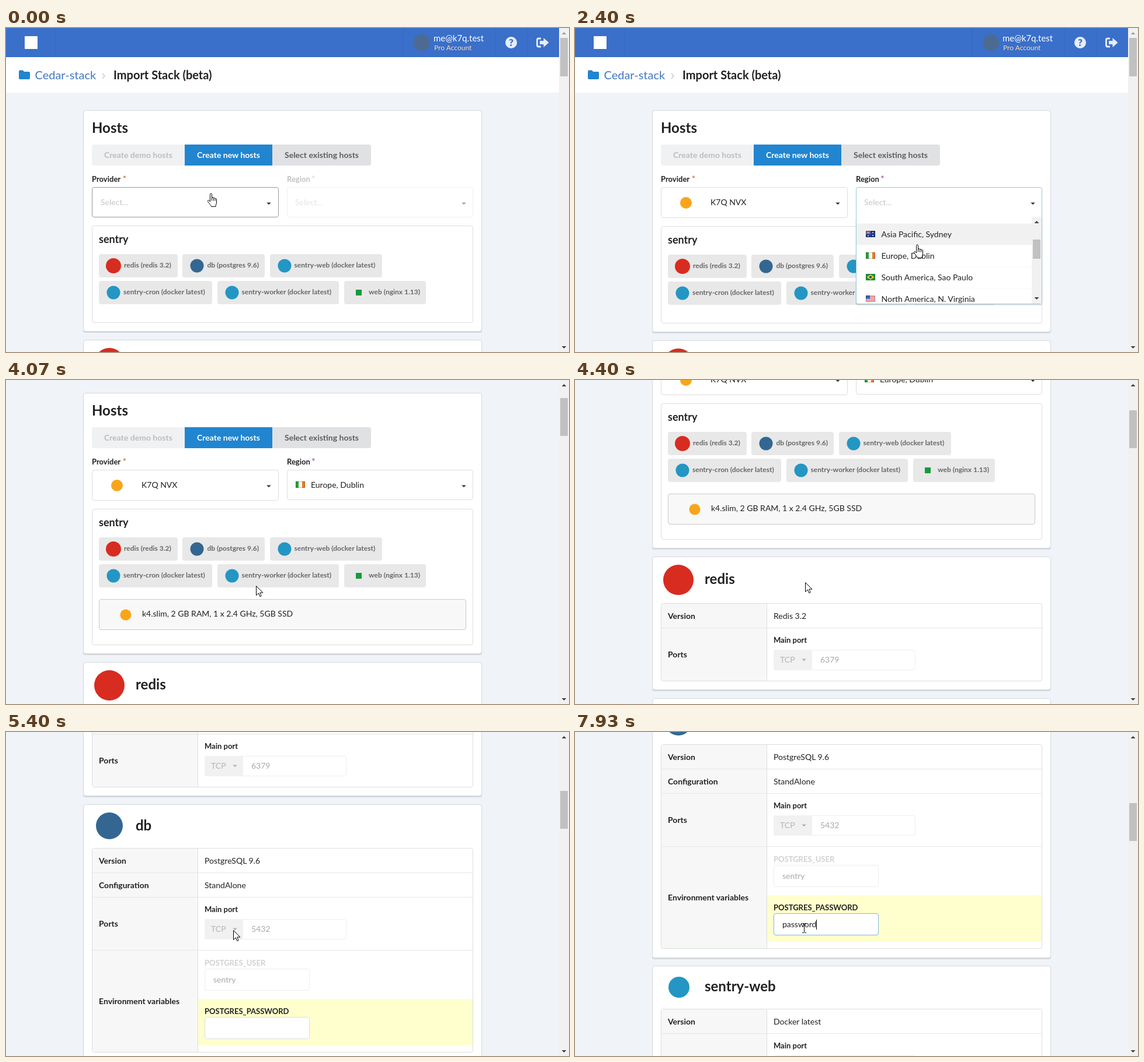
An HTML page for the animation above (8000 ms loop, 964 by 556 pixels).

```html
<!DOCTYPE html>
<html lang="en">
<head>
<meta charset="utf-8">
<title>Import Stack</title>
<style>
  html, body { margin: 0; width: 100%; height: 100%; overflow: hidden; background: #f0f3f8; }
  #stage { display: block; width: 964px; height: 556px; }
  text { font-family: Lato, "Open Sans", sans-serif; white-space: pre; }
</style>
</head>
<body>
<svg id="stage" viewBox="0 0 964 556" xmlns="http://www.w3.org/2000/svg"></svg>
<script>
const LOOP = 8000;
const INK = '#212122', LINE = '#dcddde', BLUE = '#2185d0', FOCUS = '#96c8da';
const ORANGE = '#f8a51b', RED = '#d82c20', ELEPHANT = '#336791', WHALE = '#2396c4';

// Drawing helpers: each returns SVG markup
const fill = (x, y, w, h, color, r = 0, more = '') =>
  `<rect x="${x}" y="${y}" width="${w}" height="${h}" rx="${r}" fill="${color}" ${more}/>`;
const box = (x, y, w, h, stroke = LINE, color = '#fff', r = 3.5, more = '') =>
  fill(x + .5, y + .5, w - 1, h - 1, color, r, `stroke="${stroke}" ${more}`);
const text = (x, y, s, size = 14, color = INK, weight = 400, more = '') =>
  `<text x="${x}" y="${y}" font-size="${size}" fill="${color}" font-weight="${weight}" ${more}>${s}</text>`;
const bold = (x, y, s, size = 14, color = INK) => text(x, y, s, size, color, 700);
const dot = (x, y, r, color) => `<circle cx="${x}" cy="${y}" r="${r}" fill="${color}"/>`;
const shape = (d, color, more = '') => `<path d="${d}" fill="${color}" ${more}/>`;
const group = (id, body, more = '') => `<g id="${id}" ${more}>${body}</g>`;
const hline = (x, y, w, color = LINE) => fill(x, y, w, 1, color);
const vline = (x, y, h, color = LINE) => fill(x, y, 1, h, color);
const caretDown = (x, y, color = '#333435') => shape(`M${x - 3.7} ${y - 1.5}h7.400l-3.700 3.700z`, color);
const barArrow = (x, y, dir, color, more = '') =>
  shape(`M${x - 4} ${y - 2 * dir}h8l-4 ${4 * dir}z`, color, more);

function header() {
  return fill(0, 0, 947, 50, '#3a6fca') +
    [84, 679, 838, 892].map(x => vline(x, 0, 50, '#3769c1')).join('') +
    fill(32, 14, 22, 22, '#fff') +
    dot(712, 25, 14, '#4d6b92') +
    text(732, 23, 'me@k7q.test', 15, '#fff') +
    text(733, 38, 'Pro Account', 12, '#ffd9a8') +
    dot(865, 25, 10, '#e6eefb') +
    text(865, 31, '?', 17, '#3a6fca', 900, 'text-anchor="middle"') +
    shape('M916 18h-4q-2.500 0-2.500 2.500v9q0 2.500 2.500 2.500h4', 'none', 'stroke="#e6eefb" stroke-width="2.8"') +
    shape('M914 22h6.500v-5l9 8-9 8v-5h-6.500z', '#e6eefb') +
    fill(0, 50, 947, 61, '#fff') +
    shape('M22 74.500q0-2 2-2h5l2 2.500h8q2 0 2 2v9q0 2-2 2h-15q-2 0-2-2z', BLUE) +
    text(49.5, 88, 'Cedar-stack', 20, '#4078c0') +
    shape('M165 78l4 4.500-4 4.500', 'none', 'stroke="#c4c5c6" stroke-width="1.3"') +
    bold(184, 88, 'Import Stack (beta)', 20);
}

const card = (y, h, id = '') =>
  fill(132, y + 1, 683, h + 1, '#d5d9de', 4, id && `id="${id}Shade"`) +
  box(132, y, 683, h, '#d4d8dd', '#fff', 4, id && `id="${id}"`);

function buttons() {
  return fill(147, 200, 165, 36, '#f0f1f2', 4) + fill(450, 200, 175, 36, '#dfe1e3', 4) +
    fill(306, 200, 150, 36, BLUE) +
    bold(168, 223, 'Create demo hosts', 14, '#bbbdbe') +
    bold(327, 223, 'Create new hosts', 14, '#fff') +
    bold(477, 223, 'Select existing hosts', 14, '#5c5e60');
}

const hint = x => text(x, 304, 'Select...', 14, '#c5c5c6');
const star = (x, color) => text(x, 264, '*', 16, color, 400);

function fields() {
  return bold(147, 264, 'Provider', 13) + star(199.5, '#e8502c') +
    box(147, 273, 320, 52, LINE, '#fff', 3.5, 'id="provider"') +
    group('providerHint', hint(162)) +
    group('providerValue', dot(190, 300, 10, ORANGE) + text(232, 304, 'K7Q NVX')) +
    caretDown(450, 301) +
    group('regionLabel', bold(481, 264, 'Region', 13) + star(523, '#a333c8')) +
    group('regionField', box(481, 273, 319, 52, LINE, '#fff', 3.5, 'id="region"') +
      group('regionHint', hint(495)) +
      group('regionValue', flags.ie(496, 293) + text(522, 304, 'Europe, Dublin')) +
      caretDown(784, 301));
}

const chip = ([x, y, w, cx, tx, color, label]) =>
  fill(x, y, w, 40, '#e8e8e8', 4) +
  (color === 'leaf' ? fill(cx - 5, y + 15, 10, 10, '#179a3c')
    : dot(cx, y + 20, color === RED ? 13 : 11.5, color)) +
  bold(tx, y + 23, label, 12, '#666768');

function stackBox() {
  const chips = [
    [159, 388, 135, 184, 202, RED, 'redis (redis 3.2)'],
    [302, 388, 141, 327, 344.5, ELEPHANT, 'db (postgres 9.6)'],
    [452, 388, 192, 477, 493.5, WHALE, 'sentry-web (docker latest)'],
    [159, 434, 194, 184, 201, WHALE, 'sentry-cron (docker latest)'],
    [362, 434, 208, 387, 403.5, WHALE, 'sentry-worker (docker latest)'],
    [579, 434, 140, 604, 621, 'leaf', 'web (nginx 1.13)']
  ];
  return box(147, 339, 653, 167, LINE, '#fff', 3.5, 'id="stackFrame"') +
    bold(159, 369, 'sentry', 18) + chips.map(chip).join('') +
    group('plan', box(159, 494, 629, 53, '#c8c9ca', '#f8f8f8') + dot(205, 521, 9.5, ORANGE) +
      text(233, 524, 'k4.slim, 2 GB RAM, 1 x 2.4 GHz, 5GB SSD'));
}

// Service cards: rows are [height, label, content(y)]
function table(y, rows) {
  const h = rows.reduce((sum, r) => sum + r[0], 1);
  let out = box(147, y, 653, h) + fill(148, y + 1, 180, h - 2, '#f7f7f8', 3), top = y;
  rows.forEach(([rh, label, content], i) => {
    out += content(top) + bold(159, top + rh / 2 + 5.5, label);
    if (i) out += hline(148, top, 651, '#e6e6e7');
    top += rh;
  });
  return out + vline(328, y + 1, h - 2);
}
const plain = s => y => text(340, y + 27, s);
const port = n => y => bold(340, y + 26, 'Main port', 13) +
  box(340, y + 38, 243, 35, '#eeeeef') + fill(340, y + 38, 66, 35, '#f1f1f2', 3) +
  text(351, y + 59.5, 'TCP', 14, '#b4b5b6') + caretDown(392, y + 55, '#aeafb0') +
  text(420, y + 60, n, 14, '#a8a9aa');
const env = y => bold(340, y + 27, 'POSTGRES_USER', 13, '#d0d1d2') +
  box(340, y + 32, 180, 38, '#ededee') + text(355, y + 56, 'sentry', 14, '#a8a9aa') +
  fill(329, y + 84, 470, 80, '#feffcd') + bold(340, y + 110, 'POSTGRES_PASSWORD', 13) +
  box(340, y + 115, 180, 38, LINE, '#fff', 3.5, 'id="secret"') +
  text(355, y + 139, '', 14, INK, 400, 'id="typed"') +
  fill(355, y + 126, 1, 17, '#000', 0, 'id="caret"');

function services() {
  return card(535, 229) + dot(177, 575, 26, RED) + bold(222, 582, 'redis', 24) +
    table(615, [[42, 'Version', plain('Redis 3.2')], [91, 'Ports', port('6379')]]) +
    card(778, 442) + dot(177, 815, 23, ELEPHANT) + bold(222, 823, 'db', 24) +
    table(853, [[42, 'Version', plain('PostgreSQL 9.6')], [42, 'Configuration', plain('StandAlone')],
      [91, 'Ports', port('5432')], [175, 'Environment variables', env]]) +
    card(1233, 400) + dot(178, 1270, 18, WHALE) + bold(222, 1277, 'sentry-web', 24) +
    table(1307, [[42, 'Version', plain('Docker latest')], [91, 'Ports', port('9000')]]);
}

const frame = (x, y, body) => body +
  `<rect x="${x + .5}" y="${y + .5}" width="15" height="10" fill="none" stroke="#000" stroke-opacity=".25"/>`;
const flags = {
  jp: (x, y) => frame(x, y, fill(x, y, 16, 11, '#fff') + dot(x + 8, y + 5.5, 3, '#d30000')),
  kr: (x, y) => frame(x, y, fill(x, y, 16, 11, '#fff') + dot(x + 8, y + 5.5, 3, '#2a4fa0')),
  sg: (x, y) => frame(x, y, fill(x, y, 16, 11, '#fff') + fill(x, y, 16, 5.5, '#df2020')),
  au: (x, y) => frame(x, y, fill(x, y, 16, 11, '#1c3a8c') +
    shape(`M${x} ${y}l8 6m0-6l-8 6M${x + 4} ${y}v6m-4-3h8`, 'none', 'stroke="#e8a0a8"') +
    dot(x + 4, y + 8.5, 1, '#fff') + dot(x + 12, y + 3, .9, '#fff') + dot(x + 12, y + 8, .9, '#fff')),
  ie: (x, y) => frame(x, y, fill(x, y, 16, 11, '#fff') + fill(x, y, 5, 11, '#27a03c') + fill(x + 11, y, 5, 11, '#ef7a1c')),
  br: (x, y) => frame(x, y, fill(x, y, 16, 11, '#1f9a3a') +
    shape(`M${x + 8} ${y + 1}l6 4.500-6 4.500-6-4.500z`, '#f6d81c') + dot(x + 8, y + 5.5, 2.2, '#25459c')),
  us: (x, y) => frame(x, y, fill(x, y, 16, 11, '#fff') +
    [1, 3, 5, 7, 9].map(k => fill(x, y + k, 16, 1, '#d9515c')).join('') + fill(x, y, 7, 6, '#3d62ad'))
};
const regions = [
  ['jp', 'Asia Pacific, Tokyo'], ['kr', 'Asia Pacific, Seoul'], ['sg', 'Asia Pacific, Singapore'],
  ['au', 'Asia Pacific, Sydney'], ['ie', 'Europe, Dublin'], ['br', 'South America, Sao Paulo'],
  ['us', 'North America, N. Virginia']
];

// Scrollbar inside a menu
const bar = (x, y, thumb, id) => fill(x, y, 17, 149, '#f1f1f1') +
  barArrow(x + 8.5, y + 9, -1, '#a3a3a3', `id="${id}Up"`) +
  barArrow(x + 8.5, y + 140, 1, '#404040') +
  fill(x + 2, y + 17, 13, thumb, '#c1c1c1', 0, `id="${id}Thumb"`);
const menu = (id, x, w, body) => group(id,
  fill(x, 327, w, 149, '#000', 4, 'fill-opacity=".08"') +
  fill(x - 1, 326, w + 2, 150, '#000', 4, 'fill-opacity=".04"') +
  box(x, 320, w, 154, FOCUS) + fill(x + 1, 319, w - 2, 7, '#fff') + body);

function menus() {
  const rows = dot(44, 26, 10, ORANGE) + text(86, 30, 'K7Q NVX') + hline(0, 51, 301, '#fafafa') +
    dot(43, 76, 13, '#0b80ff') + text(86, 81, 'K7Q HO') + hline(0, 102, 301, '#fafafa') +
    fill(38, 122, 12, 12, '#6a7a8a') + text(86, 132, 'My Trovn');
  const list = fill(0, 0, 301, 37, '#f1f1f2', 0, 'id="hover"') + regions.map(([f, name], i) =>
    (i ? hline(0, i * 37, 301, '#f8f8f8') : '') + flags[f](16, i * 37 + 13) + text(42.5, i * 37 + 24, name)).join('');
  return menu('providerMenu', 147, 320,
      `<svg x="148" y="324" width="301" height="149">${fill(0, 1, 301, 50, '#f1f1f2')}${rows}</svg>` +
      bar(449, 324, 90, 'pBar')) +
    menu('regionMenu', 481, 319,
      `<svg x="482" y="324" width="300" height="149">${group('list', list)}</svg>` + bar(782, 324, 33, 'rBar'));
}

function pageBar() {
  return fill(947, 0, 17, 556, '#f1f1f1') + barArrow(955.5, 9, -1, '#a3a3a3', 'id="upArrow"') +
    barArrow(955.5, 548, 1, '#404040') + fill(949, 17, 13, 66, '#c1c1c1', 0, 'id="thumb"');
}

function pointers() {
  const edge = 'stroke="#000" stroke-linejoin="round"';
  return group('pointer',
    group('hand', shape('M-1.500 15V2.500a1.500 1.500 0 0 1 3 0V9a1.500 1.500 0 0 1 3 .500a1.400 1.400 0 0 1 2.700 .600a1.300 1.300 0 0 1 2.300 1V16c0 3-1.500 4-1.500 7.500H.5c0-2-4-5.500-6-9c-.8-1.600 1.200-2.600 2.300-1.300z' +
      'M1.500 9v4.500M4.500 9.500v4M7.200 10.500v3', '#fff', edge)) +
    group('arrow', shape('M.5 .5V16.500L4.300 12.900L6.800 18.600L9.200 17.500L6.800 12H12z', '#fff', edge)) +
    group('beam', shape('M0 -11.500h2.500l1 1l1-1H7M3.500-11V3.500M0 4.500h2.500l1-1l1 1H7', 'none', 'stroke="#000"')));
}

const stage = document.getElementById('stage');
stage.innerHTML = fill(0, 0, 964, 556, '#f0f3f8') +
  group('page', header() + card(141, 380, 'hosts') + bold(147, 180, 'Hosts', 24) + buttons() + fields() +
    group('stack', stackBox()) + group('services', services()) + menus()) +
  pageBar() + pointers();

const el = {};
stage.querySelectorAll('[id]').forEach(n => el[n.id] = n);
const set = (id, name, value) => el[id].setAttribute(name, value);
const show = (id, on) => { el[id].style.display = on ? '' : 'none'; };
const shift = (id, x, y) => set(id, 'transform', `translate(${x} ${y})`);

const clamp = v => Math.max(0, Math.min(1, v));
const span = (t, a, b) => clamp((t - a) / (b - a));
const ease = p => p < .5 ? .5 * (2 * p) ** 2.25 : 1 - .5 * (2 - 2 * p) ** 2.25;

// [time, x, y] of the pointer's hot spot
const path = [
  [0, 351, 283], [400, 351, 283], [730, 323, 373], [870, 323, 373], [1000, 323, 353],
  [1200, 323, 353], [1600, 586, 300], [1730, 586, 300], [2000, 590, 345], [2070, 590, 345],
  [2330, 586, 371], [2530, 586, 371], [2730, 586, 381], [3070, 586, 381], [3470, 481, 361],
  [3670, 481, 361], [4400, 394, 347], [4600, 394, 347], [5200, 389, 340], [LOOP, 389, 340]
];
// [start, end, distance] of each wheel move
const wheel = [[3800, 4400, 300], [4533, 4800, 200], [4933, 5200, 200], [5333, 5600, 200]];
const keys = [6530, 6670, 6730, 6930, 7130, 7200, 7330, 7470];

function pointerAt(t) {
  const i = path.findIndex(k => k[0] > t), a = path[i - 1], b = path[i];
  const p = ease(span(t, a[0], b[0]));
  return [a[1] + (b[1] - a[1]) * p, a[2] + (b[2] - a[2]) * p];
}

function drop(id, t, open, close) {
  const k = t < close ? ease(span(t, open, open + 260)) : 1 - ease(span(t, close, close + 200));
  show(id, k > 0);
  set(id, 'opacity', k);
  set(id, 'transform', `translate(0 324) scale(1 ${k}) translate(0 -324)`);
}

function render(t) {
  const chosen = t >= 1200, placed = t >= 3070, planned = t >= 3330;
  const nudge = chosen ? 1 : 0, extra = planned ? 67 : 0;

  const scroll = wheel.reduce((sum, [a, b, d]) => sum + d * ease(span(t, a, b)), 0);
  shift('page', 0, -Math.round(scroll));
  set('thumb', 'y', 17 + Math.round(scroll * .1167));
  set('thumb', 'height', planned ? 65 : 66);
  set('upArrow', 'fill', scroll > 0 ? '#404040' : '#a3a3a3');

  set('provider', 'stroke', t < 130 ? '#98999a' : chosen ? LINE : FOCUS);
  set('provider', 'height', 51 + nudge);
  show('providerHint', !chosen);
  show('providerValue', chosen);
  set('regionLabel', 'opacity', chosen ? 1 : .27);
  set('regionField', 'opacity', chosen ? 1 : .45);
  set('region', 'stroke', t >= 1670 && !placed ? FOCUS : LINE);
  show('regionHint', !placed);
  show('regionValue', placed);

  shift('stack', 0, nudge);
  set('stackFrame', 'height', 166 + extra);
  show('plan', planned);
  set('hosts', 'height', 379 + nudge + extra);
  set('hostsShade', 'height', 381 + nudge + extra);
  shift('services', 0, nudge + extra);

  drop('providerMenu', t, 400, 1200);
  drop('regionMenu', t, 1700, 3070);
  const [x, y] = pointerAt(t), listTop = 100 * ease(span(t, 2030, 2330));
  shift('list', 0, -listTop);
  set('rBarThumb', 'y', 341 + listTop * .22);
  set('rBarUp', 'fill', listTop > 0 ? '#404040' : '#a3a3a3');
  set('hover', 'y', 37 * Math.max(0, Math.floor((y - 324 + listTop) / 37)));

  const focused = t >= 6000;
  set('secret', 'stroke', focused ? '#85b7d9' : LINE);
  el.typed.textContent = 'password'.slice(0, keys.filter(k => t >= k).length);
  show('caret', focused);
  set('caret', 'x', 355 + Math.round(el.typed.getComputedTextLength()));

  shift('pointer', Math.round(x), Math.round(y));
  show('hand', t < 3200);
  show('arrow', t >= 3200 && t < 5530);
  show('beam', t >= 5530 && t < 6070 || t >= 7930);
}

const start = performance.now();
function tick() {
  render((performance.now() - start) % LOOP);
  requestAnimationFrame(tick);
}
tick();
</script>
</body>
</html>
```
